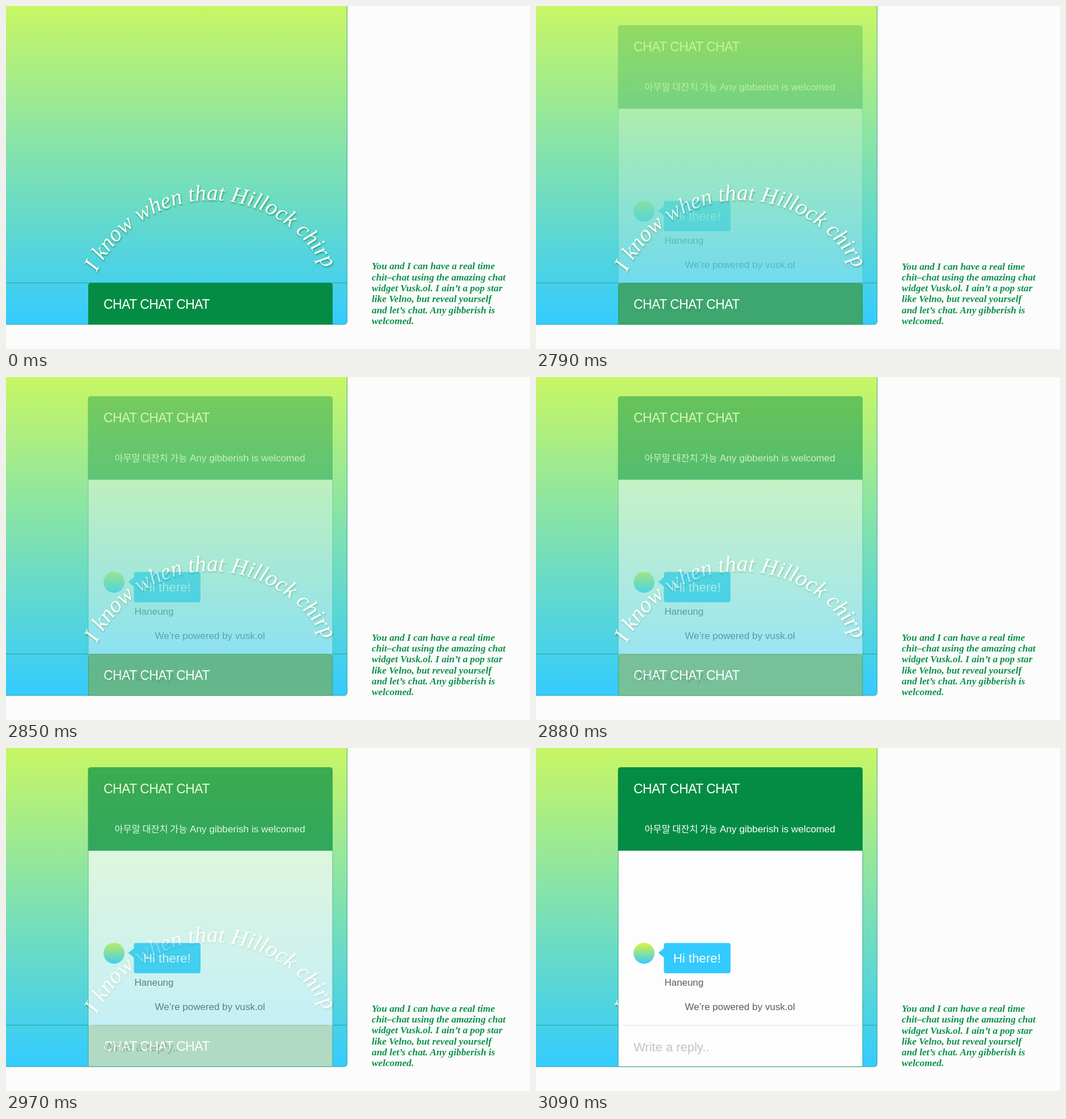
An HTML page for the animation above (5400 ms loop, 924x606 px).

```html
<!DOCTYPE html>
<html lang="en">
<head>
<meta charset="utf-8">
<title>Chat</title>
<style>
  html, body { margin: 0; height: 100%; overflow: hidden; background: #fcfcfc; }
  svg { display: block; width: 924px; height: 606px; }
  text { font-family: "Liberation Sans", Arial, sans-serif; fill: #fff; }
  .title { font-size: 23px; letter-spacing: -.55px; }
  .korean { font: 16.4px "Noto Sans CJK KR", "Noto Sans CJK", sans-serif; }
  .small { font-size: 17.2px; }
  .gray { font-size: 17px; fill: #5a5c5e; }
  .hint { font-size: 22px; fill: #c4c4c4; }
  .side text { font: italic bold 17.26px "Liberation Serif", Times, serif; fill: #0c9149; }
  .arc { font: italic 40.1px "Liberation Serif", Times, serif; fill: #fffff4;
         filter: drop-shadow(1.5px 2px 1.5px rgba(10, 110, 60, .6)); }
  .edge { fill: none; stroke: #149478; stroke-opacity: .75; }
</style>
</head>
<body>
<svg viewBox="0 0 924 606">
  <defs>
    <linearGradient id="sky" gradientUnits="userSpaceOnUse" x1="0" y1="0" x2="0" y2="563">
      <stop stop-color="#c8f664"/><stop offset="1" stop-color="#33cbff"/>
    </linearGradient>
    <linearGradient id="face" x2="0" y2="1">
      <stop stop-color="#dcf53a"/><stop offset="1" stop-color="#33cbff"/>
    </linearGradient>
    <path id="curve" d="M159.8 470.6A224 224 0 0 1 586 567"/>
  </defs>

  <g id="page">
    <rect class="edge" x="-10" y="-10" width="611.5" height="572.5" rx="5" style="fill:url(#sky)"/>
    <path class="edge" d="M0 489.2H601"/>
    <g class="side" id="side"></g>
  </g>

  <path d="M145 563V494q0-5 5-5H571q5 0 5 5V563z" fill="#048c44"/>
  <text class="title" x="172" y="535">CHAT CHAT CHAT</text>
  <text class="arc"><textPath href="#curve">I know when that Hillock chirp</textPath></text>

  <g id="panel" opacity="0">
    <path d="M145 181H576V563H145z" fill="#fdfdfd"/>
    <path class="edge" d="M145 181V563H576V181"/>
    <path d="M144.5 181.5V39q0-5 5-5H571q5 0 5 5V181.5z" fill="#048c44"/>
    <text class="title" x="172" y="80">CHAT CHAT CHAT</text>
    <text class="korean" x="191.5" y="149">아무말 대잔치 가능</text>
    <text class="small" x="324" y="149">Any gibberish is welcomed</text>
    <circle cx="190.5" cy="362.7" r="18.5" fill="url(#face)"/>
    <rect x="225.5" y="344.5" width="117.5" height="53.5" rx="4" fill="#33caff"/>
    <path d="M215.5 362L226 353.5V370.5z" fill="#33caff"/>
    <text x="242" y="379" font-size="22.2">Hi there!</text>
    <text class="gray" x="226.5" y="420">Haneung</text>
    <text class="gray" x="262.5" y="463">We’re powered by vusk.ol</text>
    <path d="M152 490H568" stroke="#e0e2e2"/>
    <text class="hint" x="172" y="535.5">Write a reply..</text>
  </g>
</svg>
<script>
  const LOOP = 5400, START = 2730, STEP = 30, STEPS = 13;
  const get = id => document.getElementById(id);

  get('side').innerHTML = [
    'You and I can have a real time',
    'chit–chat using the amazing chat',
    'widget Vusk.ol. I ain’t a pop star',
    'like Velno, but reveal yourself',
    'and let’s chat. Any gibberish is',
    'welcomed.'
  ].map((line, i) => `<text x="645" y="${465.4 + i * 19.3}">${line}</text>`).join('');

  // The panel dissolves in over equal steps; the page settles by a fraction of a pixel.
  function draw() {
    const t = performance.now() % LOOP;
    const step = Math.floor((t - START) / STEP) + 1;
    const fade = Math.min(Math.max(step / STEPS, 0), 1);
    get('panel').setAttribute('opacity', fade);
    get('page').setAttribute('transform', `translate(0 ${fade * .6})`);
    requestAnimationFrame(draw);
  }
  draw();
</script>
</body>
</html>
```
